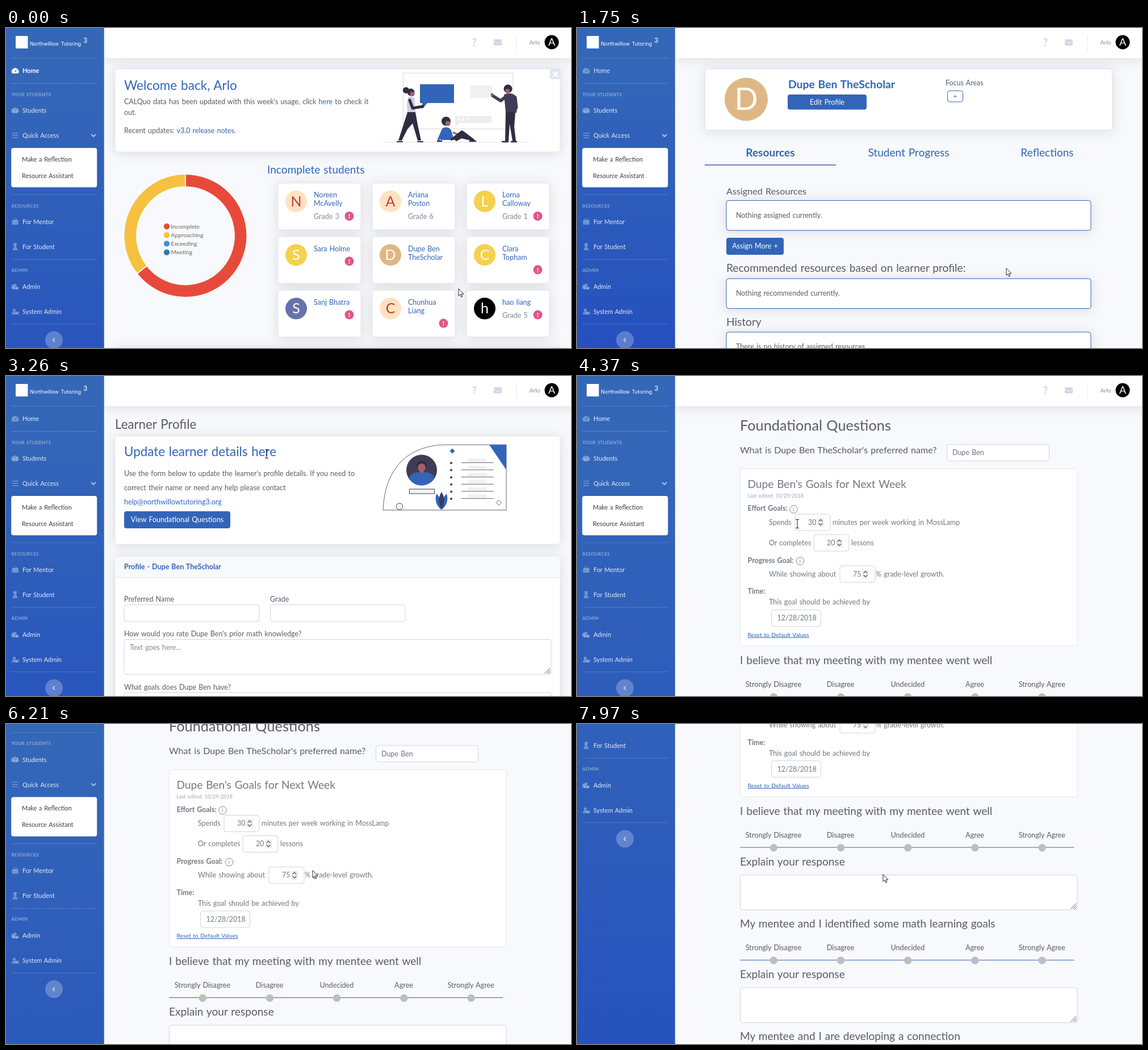
These frames come from a looping animation (995x563 px, 8 s). An HTML page:

```html
<!DOCTYPE html>
<html lang="en">
<head>
<meta charset="utf-8">
<title>Mentoring dashboard</title>
<style>
html, body { margin: 0; width: 100%; height: 100%; overflow: hidden; background: #f8f9fc; }
svg { display: block; width: 995px; height: 563px; font-family: Lato, "Open Sans", sans-serif; word-spacing: .06em; }
.mid { text-anchor: middle; }
.b { font-weight: 700; }
.u { text-decoration: underline; text-decoration-skip-ink: none; }
.sh { filter: drop-shadow(0 2px 10.5px rgba(58,59,69,.15)); }
</style>
</head>
<body>
<svg id="stage" viewBox="0 0 995 563"></svg>
<script>
const BLUE = '#3265b8', INK = '#5a5c69', GRAY = '#858796', LINE = '#d1d3e2', EDGE = '#e3e6f0';
const DARK = '#2f2e41', SLATE = '#3f3d56', SKIN = '#a0616a', PALE = '#efefef';
const BODY = 12.5, HEAD = 19.1, SIDE = 10.9;

// y is the middle of the capital letters
const T = (x, y, s, z = BODY, c = INK, cls = '') =>
  `<text x="${x}" y="${y + z * .355}" font-size="${z}" fill="${c}" class="${cls}">${s}</text>`;
const R = (x, y, w, h, f = '#fff', s = 'none', r = 4, cls = '') =>
  `<rect x="${x}" y="${y}" width="${w}" height="${h}" rx="${r}" fill="${f}" stroke="${s}" class="${cls}"/>`;
const C = (x, y, r, f, s = 'none') => `<circle cx="${x}" cy="${y}" r="${r}" fill="${f}" stroke="${s}"/>`;
const P = (d, f = 'none', s = 'none', w = 1) =>
  `<path d="${d}" fill="${f}" stroke="${s}" stroke-width="${w}" stroke-linejoin="round" stroke-linecap="round"/>`;
const link = s => `<tspan fill="${BLUE}">${s}</tspan>`;
const card = (x, y, w, h) => R(x, y, w, h, '#fff', EDGE, 4, 'sh');
const button = (x, y, w, h, s, id = '') =>
  `<g id="${id}">${R(x, y, w, h, BLUE)}</g>` + T(x + w / 2, y + h / 2, s, BODY, '#fff', 'mid');
const area = (x, y, w, h) => R(x, y, w, h, '#fff', LINE) +
  P(`M${x + w - 11},${y + h - 2}l9,-9m-5,9l5,-5m-2,5l2,-2`, 'none', '#555', 1);

function sidebar(name, height, home) {
  const dim = 'rgba(255,255,255,.32)', pale = 'rgba(255,255,255,.87)';
  const person = (x, y, f = dim, k = 1) =>
    C(x, y - 2.6 * k, 2.7 * k, f) + P(`M${x - 4.5 * k},${y + 5 * k}q0,-5 ${4.5 * k},-5t${4.5 * k},5z`, f);
  const item = (y, s) => T(29, y, s, SIDE, pale);
  const head = (y, s) => `<g letter-spacing=".25">${T(9.5, y, s, 8, 'rgba(255,255,255,.45)', 'b')}</g>`;
  const rule = y => P(`M9.5,${y}H160`, 'none', 'rgba(255,255,255,.17)');
  const hc = home ? '#fff' : dim;
  return `<linearGradient id="g${name}" x2="0" y2="1"><stop offset=".1" stop-color="#3467b8"/>
    <stop offset="1" stop-color="#234cbf"/></linearGradient>` +
    R(0, 0, 172.7, height, `url(#g${name})`, 'none', 0) +
    R(17, 14, 21.5, 22, '#fff', 'none', 0) +
    `<g font-family="Inter, sans-serif">${T(42, 27.5, 'Northwillow Tutoring', 9.1, '#fff') + T(136, 22, '3', 12, '#fff')}</g>` +
    [53, 97.5, 293, 407, 520.5].map(rule).join('') +
    P('M11,80a6.2,6.2 0 1 1 10.4,0z', hc) + P('M16,77.5l2,-4', 'none', '#3566b8', 1.2) +
    T(29, 75.5, 'Home', SIDE, home ? '#fff' : pale, home ? 'b' : '') +
    head(117, 'YOUR STUDENTS') + person(12, 145, dim, .7) + person(20, 145, dim, .7) + person(16, 145) +
    item(145.5, 'Students') + P('M11.5,185h9.5m-9.5,4h9.5m-9.5,4h9.5', 'none', dim, 1.3) +
    item(189.5, 'Quick Access') + P('M150.5,187.5l3.5,3.5l3.5,-3.5', 'none', 'rgba(255,255,255,.6)', 2) +
    R(9.2, 211, 151, 69.3) + T(28, 231, 'Make a Reflection', SIDE, '#3a3b45') +
    T(28, 260, 'Resource Assistant', SIDE, '#3a3b45') +
    head(313, 'RESOURCES') + R(10.5, 338, 11.5, 8, dim, 'none', 1) + R(13.5, 335.5, 5.5, 4, 'none', dim, 1) +
    item(341, 'For Mentor') + person(16, 386) + P('M11,380l5,-2l5,2l-5,2z', dim) + item(385, 'For Student') +
    head(426, 'ADMIN') + person(12, 455, dim, .7) + person(16, 455) + C(20, 457.5, 2.5, dim) + item(455, 'Admin') +
    person(14.5, 499) + R(17, 499, 6, 5, dim, 'none', 1) + item(499, 'System Admin') +
    C(84.5, 549, 15.5, 'rgba(255,255,255,.25)') + P('M85.5,546l-3,3l3,3', 'none', 'rgba(255,255,255,.75)', 1.5);
}

const topbar = R(173, 0, 830, 53, '#fff', 'none', 0, 'sh') + T(825, 25.5, '?', 18, LINE, 'b mid') +
  R(859, 20, 14, 10.5, LINE, 'none', 2) + P('M859.5,23l6.5,4.5l6.5,-4.5', 'none', '#fff') +
  P('M899,12V39', 'none', EDGE) + T(921.5, 25, 'Arlo', 10.3, GRAY) + C(961, 25, 12.5, '#000') + T(961, 25, 'A', 18, '#fff', 'mid');

const page = (name, height, body, home) =>
  `<g id="${name}">${R(0, 0, 995, 1300, '#f8f9fc', 'none', 0) + body + topbar + sidebar(name, height, home)}</g>`;

function homePage() {
  const people =
    P('M664,201H921', 'none', '#e0e0e0', 1.2) + R(699, 79, 194, 99, '#fff', '#e6e6e6', 0) + R(700, 80, 192, 97, 'none', '#e6e6e6', 0) +
    P('M729,99H789V132H742L733,142V132H729z', BLUE) + R(818, 101, 39, 21.5, '#f0f0f0', 'none', 0) +
    P('M791,155H855V167H799L791,174z', '#ededed') + [798, 805, 812].map(x => C(x, 161, 2, '#fff')).join('') +
    C(704.5, 109.5, 5.5, DARK) + C(713, 113, 6.5, DARK) + C(715.5, 116, 4, SKIN) +
    P('M708,122q9,-3 12,3l1,26h-13q-4,-14 0,-29z', '#d0cde1') + P('M711,127l5,14l18,-3', 'none', DARK, 5) +
    P('M707,148h14l4,22l6,28h-6l-9,-30l-9,10l-10,20h-6l9,-28z', DARK) + P('M689,200h9m27,0h9', 'none', DARK, 2) +
    C(775, 164, 8, DARK) + C(778, 168, 4.5, SKIN) + P('M769,176q10,-4 15,4l5,17h-24q-1,-14 4,-21z', BLUE) +
    P('M769,180l-7,16', 'none', BLUE, 4) + P('M788,184l14,6', 'none', SKIN, 3) +
    P('M785,196l18,-14l20,15l-21,-5l-9,5', DARK, DARK, 4) + P('M760,199h7m50,0h10', 'none', DARK, 2.5) +
    C(884, 107, 7.5, DARK) + C(883, 111, 4, SKIN) + P('M877,117q12,-5 20,2q5,14 2,30h-19z', SLATE) +
    P('M880,121l-9,7l-14,-9', 'none', SLATE, 5.5) + C(856, 117, 2.6, SKIN) + P('M897,122l2,18l-7,8', 'none', SLATE, 5) +
    P('M880,148h17l-2,26l3,25h-6l-5,-30l-2,30h-6z', DARK) + P('M874,200h10m6,0h9', 'none', DARK, 2.5);
  const peach = ['#ffe2c1', '#bd3f35'], sun = ['#f4d14e', '#fff'];
  const kids = [
    ['Noreen|McAvelly', 'Grade 3', 1, peach], ['Ariana|Poston', 'Grade 6', 0, peach], ['Lorna|Calloway', 'Grade 1', 1, sun],
    ['Sara Holme', '', 1, sun], ['Dupe Ben|TheScholar', '', 0, ['#dfb785', '#fff']], ['Clara|Topham', '', 1, sun],
    ['Sanj Bhatra', '', 1, ['#6673aa', '#fff']], ['Chunhua|Liang', '', 1, peach], ['hao liang', 'Grade 5', 1, ['#000', '#fff']]];
  const cards = kids.map(([name, grade, alert, [bg, fg]], i) => {
    const x = 479 + i % 3 * 166, y = 273 + Math.floor(i / 3) * 94.3, lines = name.split('|'), end = y + 28 + 15 * lines.length;
    return card(x, y, 146, 82) + C(x + 32, y + 32, 19, bg) + T(x + 32, y + 32, name[0], 25, fg, 'mid') +
      lines.map((s, k) => T(x + 63, y + 21 + 15 * k, s, BODY, BLUE)).join('') + T(x + 63, end + 1, grade, BODY, GRAY) +
      (alert ? C(x + 125.5, end, 8, '#dd5787') + T(x + 125.5, end, '!', 12, '#fff', 'b mid') : '');
  }).join('');
  const ring = (c, from, part) => `<circle cx="316" cy="365.5" r="97.2" fill="none" stroke="${c}" stroke-width="20.5"
    pathLength="100" stroke-dasharray="${part} 100" transform="rotate(${from - 90} 316 365.5)"/>`;
  const cut = a => `<path d="M316,280V257" stroke="#fff" stroke-width="1.8" transform="rotate(${a} 316 365.5)"/>`;
  const legend = [['Incomplete', '#e74a3b'], ['Approaching', '#f5c13e'], ['Exceeding', '#3994d8'], ['Meeting', '#2e7cae']]
    .map(([s, c], i) => C(283, 349 + i * 15.2, 5.2, c) + T(290.5, 349 + i * 15.2, s, 10.3, '#666')).join('');
  return page('home', 820,
    card(192, 72, 784, 146) + R(958, 72, 18, 18, EDGE, 'none', 2) + P('M964,78l7,7m0,-7l-7,7', 'none', '#fff', 2.5) +
    T(208, 101, 'Welcome back, Arlo', 22.6, BLUE) +
    T(208, 130, `CALQuo data has been updated with this week's usage, click ${link('here')} to check it`) +
    T(208, 149, 'out.') + T(208, 180.5, `Recent updates: ${link('v3.0 release notes.')}`) + people +
    T(460, 249, 'Incomplete students', HEAD, BLUE) + cards +
    ring('#e74a3b', 0, 64.4) + ring('#f5c13e', 232, 35.6) + cut(0) + cut(232) + legend + card(192, 562, 784, 80), true);
}

function studentPage() {
  const box = (y, s) => R(263, y, 642, 52.5, '#fff', BLUE, 4, 'sh') + T(280, y + 26, s);
  return page('student', 640,
    card(225.5, 72, 717, 107.5) + C(298, 125.5, 38, '#dfb785') + T(298, 125, 'D', 54, '#fff', 'mid') +
    T(372, 99, 'Dupe Ben TheScholar', 19.4, BLUE, 'b') + button(371, 117, 139, 26.5, 'Edit Profile', 'edit') +
    T(649, 97, 'Focus Areas') + R(652.5, 110.5, 27, 19.5, '#fff', BLUE) + T(666, 120, '+', 12, BLUE, 'mid') +
    T(340.5, 219, 'Resources', HEAD, BLUE, 'b mid') + T(584, 219, 'Student Progress', HEAD, BLUE, 'mid') +
    T(828, 219, 'Reflections', HEAD, BLUE, 'mid') + P('M225.5,241H455.5', 'none', BLUE, 1.6) +
    T(263, 287, 'Assigned Resources', 16.2) + box(303.5, 'Nothing assigned currently.') +
    button(263, 369, 101, 30, 'Assign More +') +
    T(263, 422.5, 'Recommended resources based on learner profile:', HEAD) + box(441, 'Nothing recommended currently.') +
    T(263, 517.5, 'History', HEAD) + box(535, 'There is no history of assigned resources.'));
}

function learnerPage() {
  const rows = [0, 1, 2, 3, 4, 5].map(i => {
    const y = 152.5 + i * 12.6;
    return C(784, y + .5, 2, SLATE) + P(`M802,${y}H858.5`, 'none', SLATE, .8) + R(814, y - 7, 33, 6, '#f0f0f0', 'none', 0);
  }).join('');
  const badge = P('M664,235.5Q666,180 698,148Q728,122 772,121H881V235.5z', '#fff', SLATE, .8) +
    P('M851,121H881V165z', BLUE) + C(732, 165.5, 27, SLATE) + C(732, 158, 9, DARK) + C(732, 161, 7, SKIN) +
    R(728.5, 164, 7, 8, SKIN, 'none', 0) + P('M709,180q3,-9 16,-11q7,3 14,0q13,2 16,11q-9,12 -23,12.5t-23,-12.5z', BLUE) +
    R(710.5, 199, 44, 8, '#f2f2f2', SLATE, 0) + C(693, 229.5, 5.7, '#f2f2f2', SLATE) +
    P('M786,127.5l4.5,4.5l-4.5,4.5l-4.5,-4.5z', BLUE) + P('M868,218.5l4.5,4.5l-4.5,4.5l-4.5,-4.5z', '#fff', SLATE, .8) +
    P('M766,235q-13,-12 -8,-28q12,12 8,28zM768,235q13,-12 8,-28q-12,12 -8,28z', BLUE) + P('M767,235q-9,-17 0,-31q9,14 0,31z', SLATE) + rows;
  return page('learner', 820,
    T(192, 85, 'Learner Profile', 22.3) + card(192, 105.5, 784, 190.5) + T(208, 133, 'Update learner details here', 22.4, BLUE) +
    T(208, 172, "Use the form below to update the learner's profile details. If you need to") +
    T(208, 197, 'correct their name or need any help please contact') +
    T(208, 222, 'help@northwillowtutoring3.org', BODY, BLUE) +
    button(208, 238, 187, 30, 'View Foundational Questions') + badge +
    card(192, 317, 784, 600) + R(192.5, 317.5, 783, 37, '#f8f9fc') + P('M192,354.5H976', 'none', EDGE) +
    T(208, 335.5, 'Profile - Dupe Ben TheScholar', BODY, BLUE, 'b') +
    T(208, 392.5, 'Preferred Name') + R(208, 402.5, 238, 29.5, '#fff', LINE) +
    T(465, 392.5, 'Grade') + R(465.5, 402.5, 237.5, 29.5, '#fff', LINE) +
    T(208, 454, "How would you rate Dupe Ben's prior math knowledge?") + area(208, 463.5, 752, 61.5) +
    T(218, 478, 'Text goes here...', BODY, GRAY) +
    T(208, 547.5, 'What goals does Dupe Ben have?') + area(208, 557, 752, 61.5));
}

function questionPage() {
  const G = '#757784';
  const say = (x, y, s, cls) => T(x, y, s, BODY, G, cls);
  const num = (x, y, n) => R(x, y, 62, 29, '#fff', LINE) + say(x + 23, y + 14.5, n) + R(x + 39, y + 7, 12, 15, PALE, 'none', 0) +
    P(`M${x + 42},${y + 12.5}l3,-3l3,3m0,4l-3,3l-3,-3`, 'none', '#555', 1.2);
  const info = (x, y) => C(x, y, 6.8, 'none', GRAY) + T(x, y, 'i', 9.5, GRAY, 'mid');
  const asks = ['I believe that my meeting with my mentee went well', 'My mentee and I identified some math learning goals',
    'My mentee and I are developing a connection'];
  const scale = ['Strongly Disagree', 'Disagree', 'Undecided', 'Agree', 'Strongly Agree'];
  const blocks = asks.map((s, i) => {
    const y = 500 + i * 198.3;
    return T(287, y, s, HEAD) + P(`M287.5,${y + 64}H875`, 'none', BLUE) +
      scale.map((w, k) => T(346 + k * 118.2, y + 42.5, w, 12.7, INK, 'mid') + C(346.3 + k * 118.2, y + 64.7, 6.7, '#bebebe')).join('') +
      T(287, y + 89, 'Explain your response', HEAD) + area(287.5, y + 112.5, 593.5, 61.5);
  }).join('');
  return page('questions', 1150,
    T(287, 87, 'Foundational Questions', 25.3) + T(287, 130, "What is Dupe Ben TheScholar's preferred name?", 16.1) +
    R(651.5, 120.5, 180, 29, '#fff', LINE) + T(661, 135, 'Dupe Ben', BODY, '#6e707e') +
    R(287.5, 163, 593.5, 312, '#fff', EDGE) + T(300.5, 190, "Dupe Ben's Goals for Next Week", HEAD, G) +
    T(300.5, 210.5, 'Last edited: 10/29/2018', 8.9, '#a3a5b1') +
    say(300.5, 233, 'Effort Goals:', 'b') + info(381.5, 234.5) +
    say(338, 257.5, 'Spends') + num(384, 243, 30) + say(450, 257.5, 'minutes per week working in MossLamp') +
    say(338, 293.5, 'Or completes') + num(417, 279, 20) + say(483, 293.5, 'lessons') +
    say(300.5, 324.5, 'Progress Goal:', 'b') + info(393, 325.5) +
    say(338, 348.5, 'While showing about') + num(463, 334, 75) + say(526, 348.5, '% grade-level growth.') +
    say(300.5, 379, 'Time:', 'b') + say(338, 398, 'This goal should be achieved by') +
    R(342.5, 411.5, 87, 29, '#fff', LINE) + say(352.5, 426, '12/28/2018') +
    T(300.5, 455, 'Reset to Default Values', 10.3, BLUE, 'u') + blocks);
}

const shapes = {
  arrow: P('M0,0V12.3L2.8,9.7L4.8,14.3L6.8,13.4L4.8,9H8.6z', '#fff', '#111', .9),
  hand: P('M-1.5,9V1.2Q-1.5,0 -.2,0T1.1,1.2V5.5Q2.4,4.6 3.4,6Q4.7,5.2 5.6,6.6Q7.6,6.2 7.6,8.2V11Q7.6,13 6,15H-.6L-4.6,9.6Q-5.2,8 -3.6,7.8z', '#fff', '#111', .9),
  beam: P('M-2.5,-7.5H-.8L0,-7L.8,-7.5H2.5M0,-7V7M-2.5,7.5H-.8L0,7L.8,7.5H2.5', 'none', '#111', 1)
};

const $ = id => document.getElementById(id);
$('stage').innerHTML = homePage() + studentPage() + learnerPage() + questionPage() +
  `<circle id="ring" r="9.5" fill="rgba(255,225,0,.4)"/><g id="cursor">` +
  Object.entries(shapes).map(([k, d]) => `<g id="${k}">${d}</g>`).join('') + '</g>';

const pages = [['home', -2, -1], ['student', 1120, 1540], ['learner', 2890, 3200], ['questions', 3950, 4350]];
const path = [[0, 797, 459], [50, 797, 459], [470, 756, 423], [2000, 756, 423], [2650, 459, 137], [3270, 459, 137],
  [3670, 388, 258], [4420, 388, 260], [4720, 388, 260], [5140, 543, 261], [5390, 543, 261], [5490, 543, 259],
  [5700, 543, 259], [6060, 540, 258], [7090, 540, 258], [7340, 541, 257], [7600, 541, 257], [7970, 539, 265], [8000, 539, 265]];
const kinds = [[0, 'arrow'], [360, 'hand'], [1330, 'arrow'], [2500, 'hand'], [3040, 'beam'], [3570, 'hand'],
  [4150, 'beam'], [5700, 'arrow'], [7090, 'beam'], [7560, 'arrow']];
const clicks = [[620, 820], [2690, 2790], [3730, 3900]];
const notches = [[5660, 6060], [6170, 6420], [6790, 7090], [7296, 7566], [7835, 8105]];

const ramp = (t, a, b) => Math.min(1, Math.max(0, (t - a) / (b - a)));
const ease = (t, a, b) => { const k = ramp(t, a, b); return k * k * (3 - 2 * k); };

function draw() {
  const t = performance.now() % 8000;
  pages.forEach(([id, a, b], i) => {
    const next = pages[i + 1], g = $(id);
    g.style.display = t < a || (next && t >= next[2]) ? 'none' : '';
    g.style.opacity = ramp(t, a, b);
  });
  const scroll = notches.reduce((sum, [a, b]) => sum + 77 * ease(t, a, b), 0);
  $('questions').setAttribute('transform', `translate(0 ${-scroll})`);
  $('edit').firstChild.setAttribute('fill', t > 2500 ? '#2a559b' : BLUE);

  const i = path.findIndex(p => p[0] > t), [a, x0, y0] = path[i - 1], [b, x1, y1] = path[i], k = ease(t, a, b);
  const at = `translate(${x0 + (x1 - x0) * k} ${y0 + (y1 - y0) * k})`;
  $('cursor').setAttribute('transform', at);
  $('ring').setAttribute('transform', at);
  $('ring').style.display = clicks.some(([s, e]) => t >= s && t < e) ? '' : 'none';
  const kind = kinds.filter(e => e[0] <= t).pop()[1];
  for (const name in shapes) $(name).style.display = name === kind ? '' : 'none';
  requestAnimationFrame(draw);
}
draw();
</script>
</body>
</html>
```
